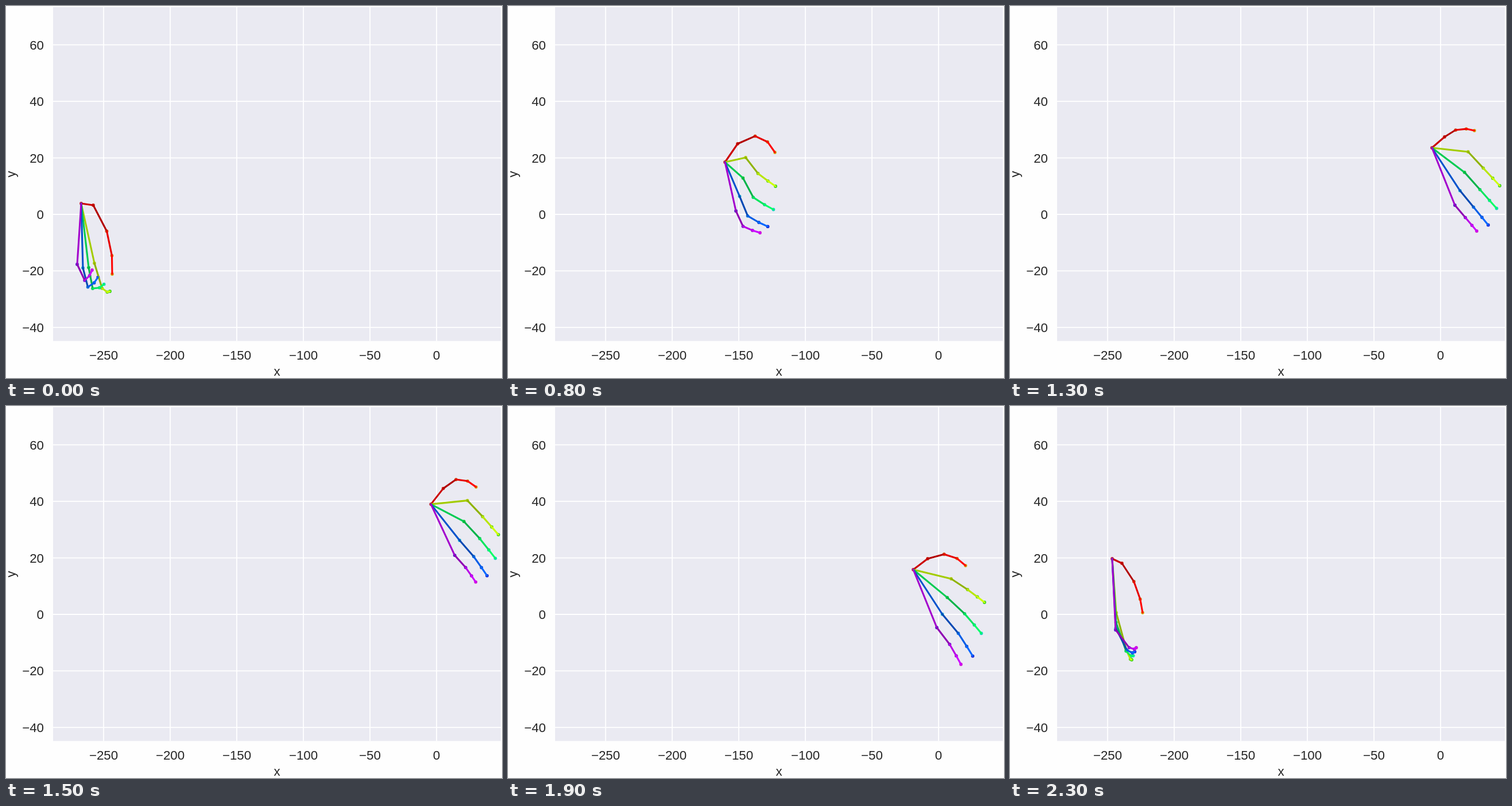
An HTML page with a canvas that plays this animation: 864 px wide and 648 px high, repeating every 2400 ms.

```html
<!DOCTYPE html>
<html lang="en">
<head>
<meta charset="utf-8">
<title>Hand motion plot</title>
<style>
  html, body { margin: 0; width: 100%; height: 100%; overflow: hidden; background: #fefefe; }
  canvas { display: block; }
</style>
</head>
<body>
<canvas id="plot" width="864" height="648"></canvas>
<script>
const ctx = document.getElementById('plot').getContext('2d');
const LOOP = 2400, STEP = 100;
const AREA = { x: 82, y: 2, w: 780, h: 581.5 };

// A shape: grip (0 open, 1 fist), curl of the fingers in px, and the base and
// tip of thumb, index and little finger, measured from the wrist.
const shape = (grip, curl, thumb, index, little) => [grip, curl, ...thumb, ...index, ...little];

const fist = shape(1, 24, [21, 3, 54, 123], [23, 104, 50, 153], [-7, 106, 19, 116]);
const cup = shape(0, 13, [22, -32, 87, -17], [36, -8, 88, 42], [19, 85, 61, 123]);
const fan = shape(0, 0, [22, -19, 74, -30], [63, 7, 118, 66], [40, 100, 78, 145]);
const raised = shape(0, -3, [21, -36, 86, -30], [64, -20, 117, 40], [42, 78, 78, 126]);
const lowered = shape(0, -3, [25, -19, 91, -7], [66, 16, 124, 57], [41, 101, 83, 165]);
const hook = shape(1, 9, [17, 8, 53, 94], [7, 94, 34, 176], [6, 124, 42, 155]);

const key = (time, x, y, hand) => ({ time, vals: [x, y, ...hand] });
const keys = [
  key(0, 131, 344, fist),
  key(400, 123.5, 345, fist),
  key(800, 378, 272, cup),
  key(1300, 735, 247, fan),
  key(1700, 742, 104, raised),
  key(1900, 706, 285, lowered),
  key(2300, 178, 266, hook)
];

const mix = (a, b, u) => a + (b - a) * u;

const slope = (k, i) =>
  (keys[k + 1].vals[i] - keys[k].vals[i]) / (keys[k + 1].time - keys[k].time);

// Monotone tangent: never overshoots a key.
function tangent(k, i) {
  if (k === 0) return 0;
  if (k === keys.length - 1) return slope(k - 1, i);
  const a = slope(k - 1, i), b = slope(k, i);
  return a * b > 0 ? 2 * a * b / (a + b) : 0;
}

function valuesAt(time) {
  let k = 0;
  while (k < keys.length - 2 && time >= keys[k + 1].time) k++;
  const p = keys[k], q = keys[k + 1], span = q.time - p.time;
  const u = Math.min(1, (time - p.time) / span), v = 1 - u;
  return p.vals.map((a, i) =>
    a * (1 + 2 * u) * v * v + q.vals[i] * u * u * (3 - 2 * u) +
    span * u * v * (v * tangent(k, i) - u * tangent(k + 1, i)));
}

// Point on the way from a to b; round 1 follows a quarter ellipse, 0 a line.
function between(a, b, f, round) {
  const q = f * Math.PI / 2;
  return [
    mix(a[0], b[0], mix(f, 1 - Math.cos(q), round)),
    mix(a[1], b[1], mix(f, Math.sin(q), round))
  ];
}

// Point at share s of the chord, pushed sideways by bow.
function bowed(a, b, s, bow) {
  const dx = b[0] - a[0], dy = b[1] - a[1], len = Math.hypot(dx, dy) || 1;
  return [a[0] + dx * s - dy / len * bow, a[1] + dy * s + dx / len * bow];
}

// Five chains of four joints each, relative to the wrist.
function handChains(vals) {
  const [grip, curl, ...c] = vals;
  const [thumb, thumbTip, index, indexTip, little, littleTip] =
    [0, 2, 4, 6, 8, 10].map(i => c.slice(i, i + 2));

  const dx = thumbTip[0] - thumb[0], dy = thumbTip[1] - thumb[1];
  const bend = 0.55 * (dx * thumb[1] - dy * thumb[0]) / Math.hypot(dx, dy);
  const chains = [[thumb, bowed(thumb, thumbTip, 0.4, bend),
    bowed(thumb, thumbTip, 0.75, bend * 0.75), thumbTip]];

  for (let i = 0; i < 4; i++) {
    const f = i / 3;
    const base = between(index, little, f, 0.3 * (1 - grip));
    base[1] += 8 * grip * Math.sin(Math.PI * f);
    const tip = between(indexTip, littleTip, f, 1 - grip);
    const bow = curl * Math.sin(0.4 + 0.55 * i);
    chains.push([base, bowed(base, tip, 0.48 + 0.32 * grip, bow),
      bowed(base, tip, 0.78 + 0.2 * grip, bow * 0.5), tip]);
  }
  return chains;
}

const TINTS = [[1, 0, 0], [0.8, 1, 0], [0, 1, 0.4], [0, 0.4, 1], [0.8, 0, 1]];
const SHADES = [204, 179, 230, 255];

const boneColor = (f, j) => `rgb(${TINTS[f].map(c => Math.round(c * SHADES[j])).join()})`;
const jointColor = n => `hsl(${n * 15.5 - 10}, 78%, 46%)`;

function line([x1, y1], [x2, y2], color, width) {
  ctx.strokeStyle = color;
  ctx.lineWidth = width;
  ctx.beginPath();
  ctx.moveTo(x1, y1);
  ctx.lineTo(x2, y2);
  ctx.stroke();
}

function dot([x, y], color) {
  ctx.fillStyle = color;
  ctx.beginPath();
  ctx.arc(x, y, 2.9, 0, 2 * Math.PI);
  ctx.fill();
}

const label = n => String(n).replace('-', '\u2212');

function drawAxes() {
  const right = AREA.x + AREA.w, bottom = AREA.y + AREA.h;
  ctx.fillStyle = '#fefefe';
  ctx.fillRect(0, 0, 864, 648);
  ctx.fillStyle = '#eaeaf2';
  ctx.fillRect(AREA.x, AREA.y, AREA.w, AREA.h);
  ctx.font = '22.3px "Liberation Sans", Arial, sans-serif';
  ctx.fillStyle = '#262626';
  ctx.lineCap = 'butt';
  ctx.textAlign = 'center';
  for (let n = -250; n <= 0; n += 50) {
    const x = 750 + n * 2.32;
    line([x, AREA.y], [x, bottom], '#fff', 1.8);
    ctx.fillText(label(n), x, 616);
  }
  ctx.fillText('x', 472, 644);
  ctx.textAlign = 'right';
  for (let n = -40; n <= 60; n += 20) {
    const y = 363 - n * 4.922;
    line([AREA.x, y], [right, y], '#fff', 1.8);
    ctx.fillText(label(n), 66, y + 8);
  }
  ctx.save();
  ctx.translate(15.5, 293);
  ctx.rotate(-Math.PI / 2);
  ctx.textAlign = 'center';
  ctx.fillText('y', 0, 0);
  ctx.restore();
}

function drawHand([x, y, ...hand]) {
  const wrist = [0, 0], chains = handChains(hand);
  ctx.save();
  ctx.beginPath();
  ctx.rect(AREA.x, AREA.y, AREA.w, AREA.h);
  ctx.clip();
  ctx.translate(x, y);
  dot(wrist, jointColor(0));
  chains.flat().forEach((p, i) => dot(p, jointColor(i + 1)));
  ctx.lineCap = 'round';
  chains.forEach((chain, f) => chain.forEach((p, j) =>
    line(j ? chain[j - 1] : wrist, p, boneColor(f, j), 3.1)));
  ctx.restore();
}

let start = null;
function tick(now) {
  if (start === null) start = now;
  const time = Math.floor((now - start) % LOOP / STEP) * STEP;
  drawAxes();
  drawHand(valuesAt(time));
  requestAnimationFrame(tick);
}
requestAnimationFrame(tick);
</script>
</body>
</html>
```
